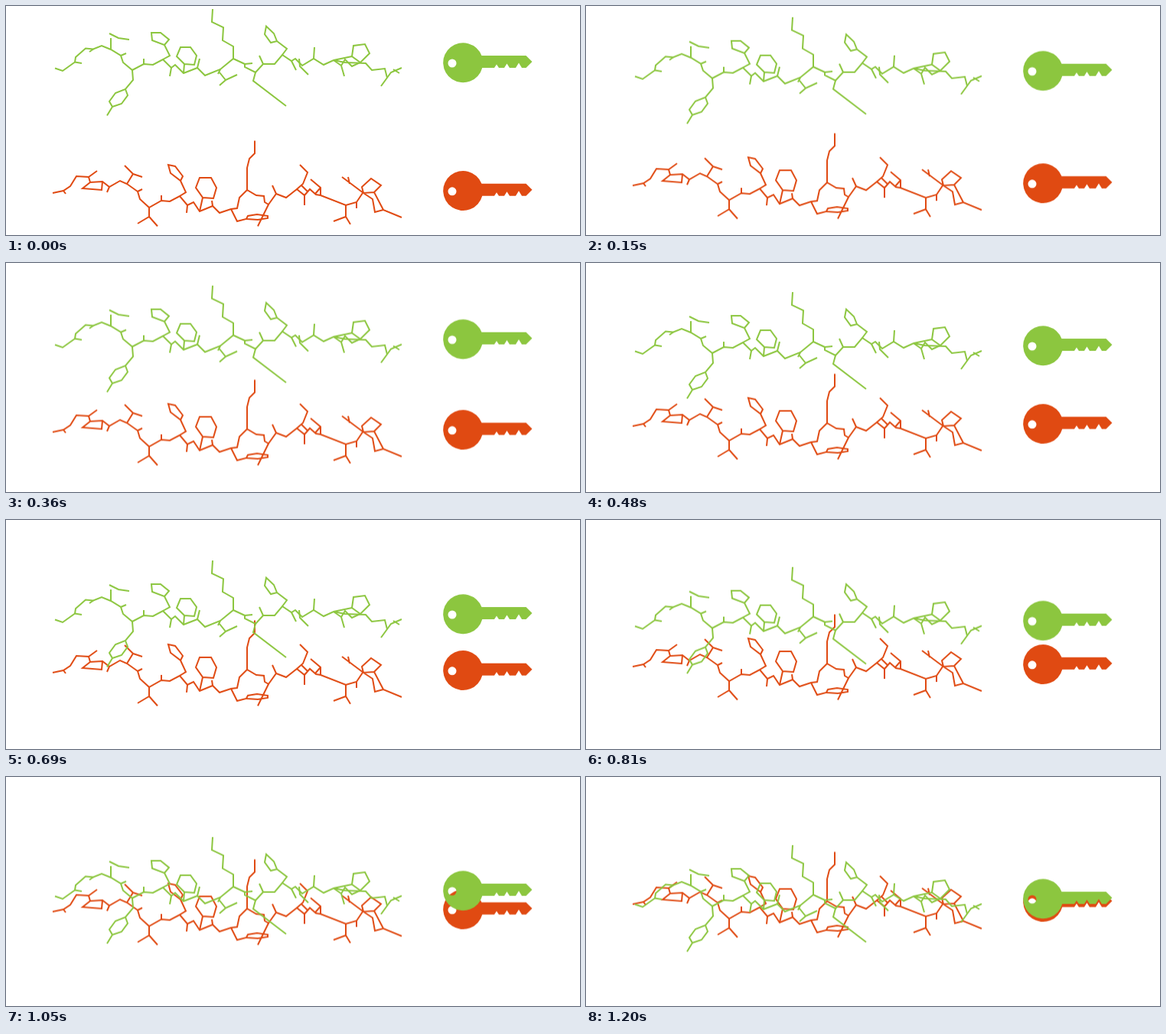
An HTML page that plays this animation: 750x300 px, repeating every 1.26 s.

```html
<!DOCTYPE html>
<html lang="en">
<head>
<meta charset="utf-8">
<title>Two chains, two keys</title>
<style>
  html, body { margin: 0; width: 100%; height: 100%; overflow: hidden; background: #fff; }
  svg { display: block; width: 750px; height: 300px; }
  .chain { fill: none; stroke: currentColor; stroke-width: 2; }
  .key { fill: currentColor; }
  .upper { color: #8cc63f; --shift: 85.3px; }
  .lower { color: #e04a12; --shift: -78.4px; }
  .upper, .lower { animation: meet 1260ms infinite; }
  /* 40 steps of 30 ms, then a last hold of 60 ms */
  @keyframes meet {
    0% { transform: translateY(0); animation-timing-function: steps(40, end); }
    95.238%, 100% { transform: translateY(var(--shift)); }
  }
</style>
</head>
<body>
<svg viewBox="0 0 750 300">
  <defs>
    <path id="key" fill-rule="evenodd" d="M621.5 65H679.5L687.5 73L679.5 81H674L670 74.5L666 81H658L654.5 75.5L651 81H644L641 76.5L638 81H622.3A26 26 0 1 1 621.5 65ZM577.5 75a5.5 5.5 0 1 0 11 0a5.5 5.5 0 1 0 -11 0Z"/>
  </defs>

  <g class="lower">
    <g class="chain">
      <!-- backbone -->
      <path d="M61 245L75 242L84 236L92 223L108 224L110 231L126 230L135 237L149 229L158 233L172 243L175 253L187 264L203 255L214 256L227 249L237 261L245 257L253 269L270 262L279 271L294 266L302 265L305 251L315 241L327 248L337 249L338 257L343 260L353 246L366 251L380 240L390 248L397 240L405 247L411 248L444 261L458 257L466 245"/>
      <!-- side groups -->
      <path d="M75 242L78 246M108 224L119 216M110 231L100 239L125 241L126 230M135 237L132 244M158 233L166 220L178 224M166 220L155 209M172 243L178 240M187 264V276L172 285M187 276L198 288.5M203 255V248"/>
      <path d="M227 249L235 244L228 229L215 219L212 208L221 210L231 223L228 229M237 261L236 271M270 262L269 255M253 269L257 251L248 238L253 225H268L275 238L271 252L257 251"/>
      <path d="M315 241V212L318 200L325 193V176.5M294 266L302 282L314 279L316 275L328 273L342 275V278L329 280L314 279M343 260L329 288.5M353 246L348 235"/>
      <path d="M380 240L388 233L394 218L384 208M386 235L394 243M390 248V261M398 227L411 238V248M411 238L404 246M444 261V276L428 282M444 276L450 286M458 257V265"/>
      <path d="M439 224L467 245L479 253L482 270L493 267L517 277M447 224L449 233M493 267L481 244L490 235L477 226L465 237L467 245L481 244"/>
    </g>
    <use class="key" href="#key" y="167.8"/>
  </g>

  <g class="upper">
    <g class="chain">
      <!-- backbone -->
      <path d="M64 81.5L74 85L90 73.5L91 67L104 55.5L114 56.5L125 52L137 57L150 65L153 74L165 84L180 76L192 77L205 70L216 81L221 77L232 88L250 81L260 91L280 83L297 69L312 76V80L326 87L336 76H351L361 64L373 72L378 69L387 78L402 69L415 77L428 71L443 74L470 75L478 84L495 82L498 94"/>
      <!-- side groups -->
      <path d="M90 73.5L99 75M109 60L114 56.5M137 57V42M135 36L147 42L161 44M150 65L157 62M180 76V69M165 84L166 97L156 109L143 114L135 125L139 132L151 128L159 117L156 109M139 132L132 143.5"/>
      <path d="M205 70L214 65L207 51L191 45L190 35H202L213 44L207 51M216 81L214 92M250 81L253 69M232 88L233 76L223 66L228 54H241L249 65L246 77L233 76"/>
      <path d="M297 69V53L283 45L284 28L269 21L270 4M280 83L277 89M279 87L287 97L302 90M287 97L279 104M312 76L322 75M326 87L323 98L366 131M336 76L331 65"/>
      <path d="M361 64L367 56L354 46L346 48L338 37L340 26.5L350 36L354 46M373 72L379 84M383 69L384 79L395 90M402 69L403 54"/>
      <path d="M428 71L438 78L442 92M438 78L443 70L452 79L463 74L475 62L469 50L454 52L452 66L463 74M428 71L452 66M490 105L498 94L503 87L517 81M506 83L514 88"/>
    </g>
    <use class="key" href="#key"/>
  </g>
</svg>
</body>
</html>
```
